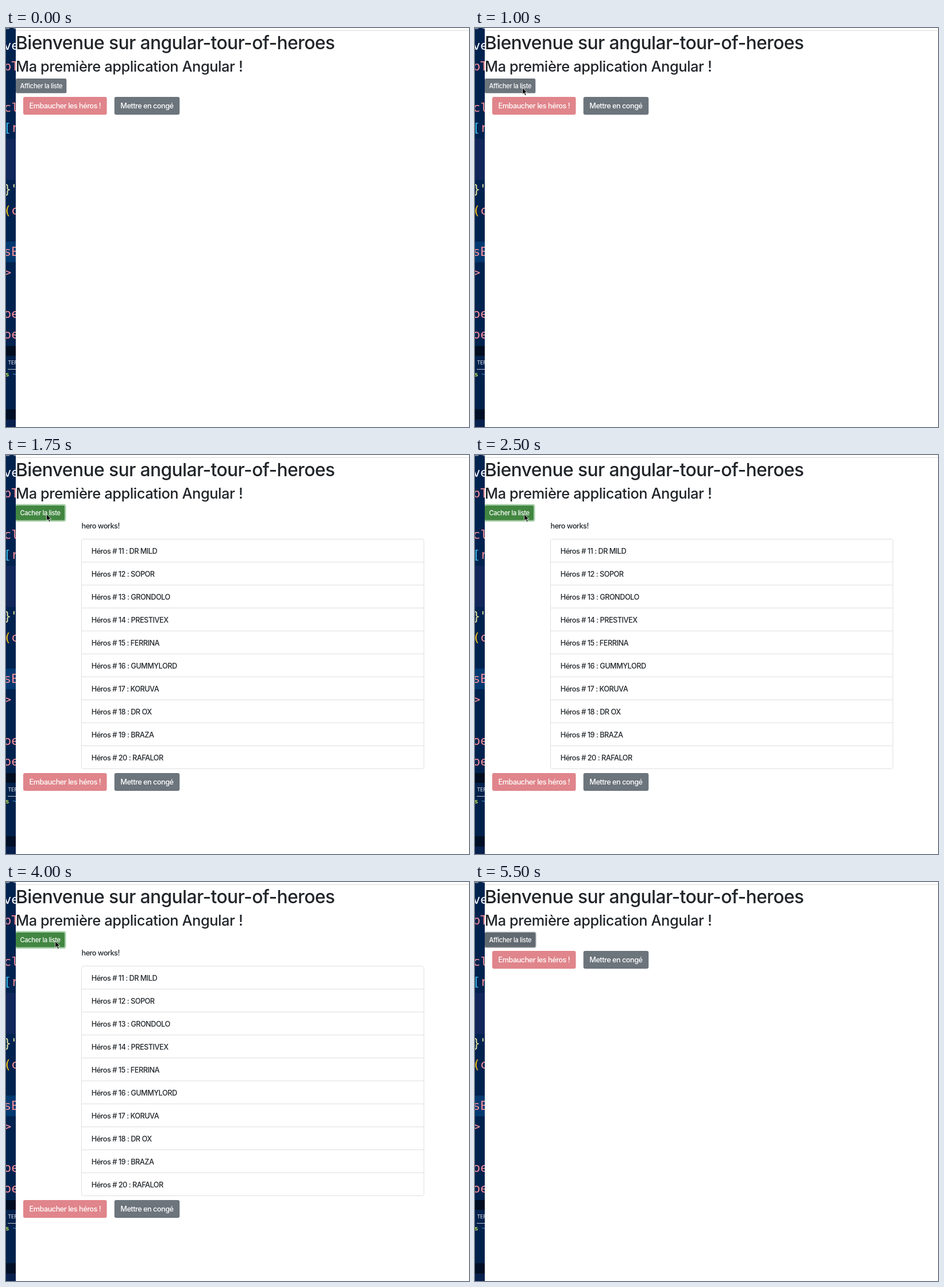
Animation, 806 px wide and 695 px high, one loop 5.75 s. Source, as an HTML page:

```html
<!DOCTYPE html>
<html lang="fr">
<head>
<meta charset="utf-8">
<style>
html, body { margin: 0; width: 100%; height: 100%; overflow: hidden; background: #fff }
svg { display: block; width: 806px; height: 695px }
text { font: 450 12.66px Inter, sans-serif; font-optical-sizing: none; letter-spacing: -.47px; fill: #212529; white-space: pre }
.h1 { font-size: 31.7px; font-weight: 500; letter-spacing: -.55px }
.h2 { font-size: 25.3px; font-weight: 500; letter-spacing: -.37px }
.light { fill: #fff }
.small { font-size: 11.08px; letter-spacing: -.32px }
.code { font: 22px "DejaVu Sans Mono", monospace; letter-spacing: 0 }
</style>
</head>
<body>
<svg viewBox="0 0 806 695">
  <g id="editor"></g>
  <rect x="17" width="789" height="695" fill="#fff"/>
  <rect x="17" y="4" width="789" height="1" fill="#dcdcdc"/>
  <text class="h1" x="17" y="37">Bienvenue sur angular-tour-of-heroes</text>
  <text class="h2" x="17" y="76">Ma première application Angular !</text>

  <svg x="17" y="80" width="120" height="40">
    <rect id="ring" rx="4"/>
    <rect id="toggle" y="8" height="25.5" rx="2.6"/>
    <text id="label" class="light small" x="7.5" y="25"></text>
  </svg>

  <g id="list">
    <text x="131.5" y="128">hero works!</text>
    <rect x="131.5" y="146.5" width="596" height="400" rx="3.3" fill="none" stroke="#dfdfdf"/>
    <g id="rows"></g>
  </g>

  <g id="actions">
    <rect x="30" y="120" width="145.5" height="31" rx="3.3" fill="#e0858b"/>
    <text class="light" x="40.6" y="140">Embaucher les héros !</text>
    <rect x="188.7" y="120" width="113.5" height="31" rx="3.3" fill="#6c747c"/>
    <text class="light" x="199.3" y="140">Mettre en congé</text>
  </g>

  <path id="cursor" d="M0 0V11.6L2.7 9.1 4.6 13.6 6.6 12.8 4.7 8.4H8.2Z" stroke="#fff" stroke-width=".8"/>
</svg>
<script>
const $ = id => document.getElementById(id);
const LOOP = 5750;

// Editor strip: background bands [y, colour], then code [x, baseline, colour, text]
const bands = [[0, '#00224f'], [193, '#11265b'], [265, '#00224f'], [372, '#023970'], [408, '#00224f'],
  [554, '#000d20'], [571, '#00214c'], [664, '#000f25'], [682, '#08204d']];
const pink = '#f4909a';
const code = [[-4, 2, '#8d98a8', 'oc'], [-4, 38, '#fff', 've'], [-4, 74, pink, 'bT'], [-4, 146, pink, 'cl'],
  [-4, 181, '#35b8e8', '['], [9, 181, pink, 'r'], [-4, 288, '#e6e6a0', '}"'], [-4, 325, '#f5c518', '('],
  [9, 325, pink, 'c'], [-4, 397, pink, 'sB'], [-4, 433, pink, '>'], [-4, 505, pink, 'oe'], [-4, 541, pink, 'oe']];
$('editor').innerHTML =
  bands.map(([y, c]) => `<rect y="${y}" width="17" height="${695 - y}" fill="${c}"/>`).join('') +
  code.map(([x, y, c, s]) => `<text class="code" x="${x}" y="${y}" style="fill:${c}">${s.replace('>', '&gt;')}</text>`).join('') +
  `<text x="3.5" y="586" style="font-size:8.5px;letter-spacing:0;fill:#d5dae2">TERMINAL</text>
   <rect x="3" y="594" width="14" height="1" fill="#c5ccd6"/>
   <text class="code" x="-1" y="607" style="font-size:11px;font-weight:700;fill:#b8e05a">s</text>
   <text class="code" x="11.5" y="607" style="font-size:11px;fill:#4da3e0">~</text>`;

const heroes = ['DR MILD', 'SOPOR', 'GRONDOLO', 'PRESTIVEX', 'FERRINA', 'GUMMYLORD', 'KORUVA', 'DR OX', 'BRAZA', 'RAFALOR'];
$('rows').innerHTML = heroes.map((name, i) =>
  (i ? `<path d="M132 ${146.5 + 40 * i}H727" stroke="#dfdfdf"/>` : '') +
  `<text x="148.7" y="${171.5 + 40 * i}">Héros # ${11 + i} : ${name}</text>`).join('');

// Pointer tip: [start time, x, y]; without x it is hidden
const pointer = [[0], [250, 285, 25], [500, 130.5, 62], [750, 82.5, 104], [1500, 70.5, 103], [2000, 83, 103],
  [2250, 95.5, 101.5], [2500, 85.7, 103], [5000, 238.7, 36], [5250]];

// Toggle button: [start time, list open, fill, focus ring colour, ring width]
const grayRing = '#b9bdc1', greenRing = '#a8cfaa';
const states = [[0, false, '#6c747c', 'none', 0], [1500, false, '#5b6268', 'none', 0], [1750, true, '#418641', greenRing, 2.5],
  [3000, false, '#5b6268', grayRing, 2.5], [4000, true, '#418641', greenRing, 2.5],
  [4750, false, '#477a4f', greenRing, 2.5], [5000, false, '#626a71', grayRing, 2.5], [5500, false, '#626a71', grayRing, 1.5]];

const at = (steps, t) => steps.findLast(s => s[0] <= t);

function setAttrs(id, attrs) {
  for (const name in attrs) $(id).setAttribute(name, attrs[name]);
}

function draw(t) {
  const [, x, y] = at(pointer, t);
  const shown = x !== undefined;
  $('cursor').style.display = shown ? '' : 'none';
  if (shown) setAttrs('cursor', { transform: `translate(${x} ${y})` });

  const [, open, fill, ring, spread] = at(states, t);
  const width = open ? 85 : 88.3;
  setAttrs('toggle', { width, fill });
  setAttrs('ring', { x: -spread, y: 8 - spread, width: width + 2 * spread, height: 25.5 + 2 * spread, fill: ring });
  $('label').textContent = open ? 'Cacher la liste' : 'Afficher la liste';
  $('list').style.display = open ? '' : 'none';
  setAttrs('actions', { transform: `translate(0 ${open ? 434 : 0})` });
}

const start = performance.now();
function tick() {
  draw((performance.now() - start) % LOOP);
  requestAnimationFrame(tick);
}
tick();
</script>
</body>
</html>
```
